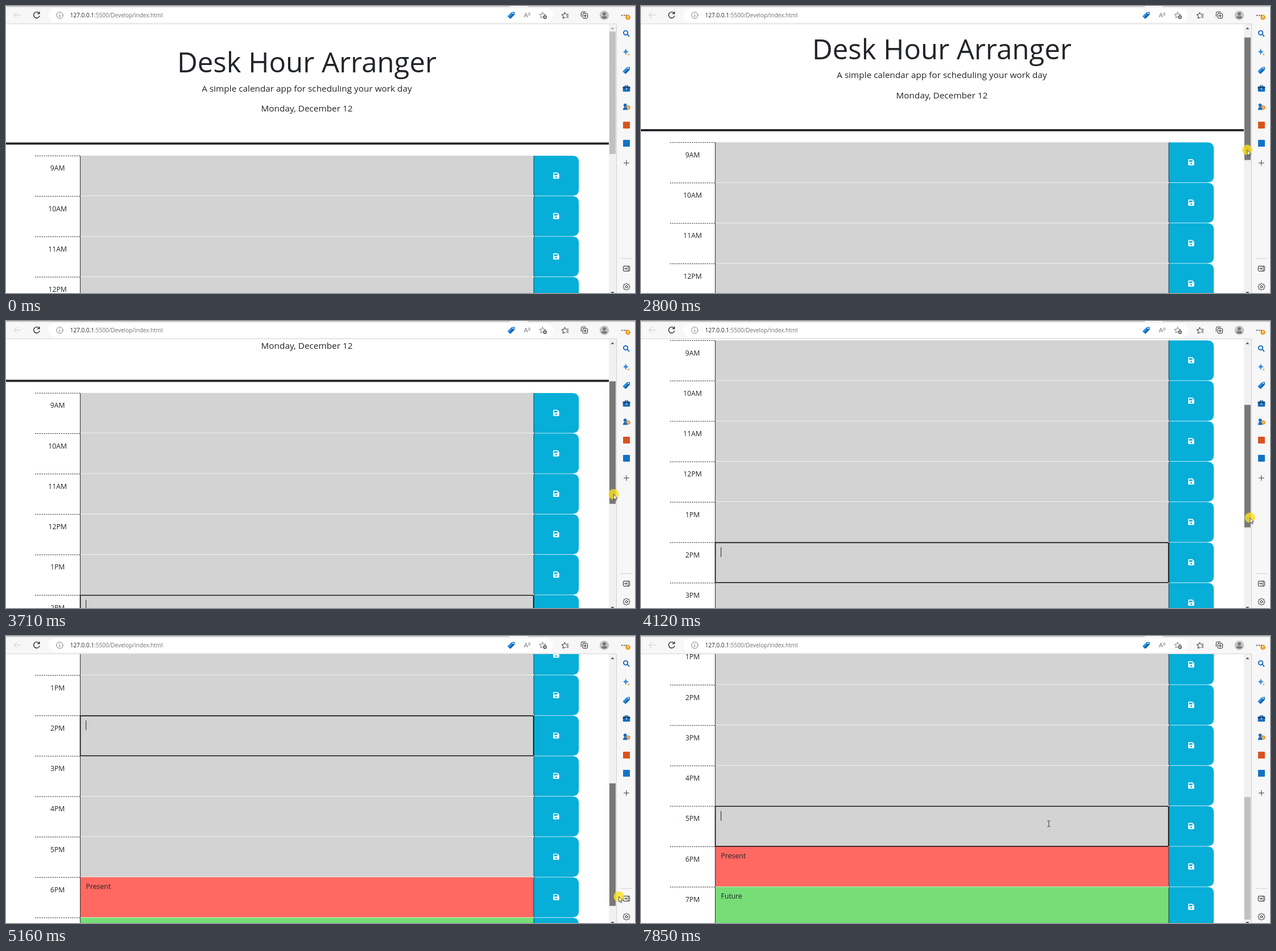
These frames come from a looping animation (1106 px wide and 506 px high, 7.99 s). An HTML page:

```html
<!DOCTYPE html>
<html lang="en">
<head>
<meta charset="utf-8">
<title>Day planner</title>
<style>
  html, body { margin: 0; height: 100%; overflow: hidden; background: #fff; }
  svg { display: block; }
  text { font-family: "Open Sans", "Noto Sans", sans-serif; fill: #212529; }
  .mid { text-anchor: middle; }
  .line { fill: none; stroke: #3b3b3b; stroke-linecap: round; stroke-linejoin: round; }
  .small { font-size: 12.27px; }
</style>
</head>
<body>
<svg width="1106" height="506" viewBox="0 0 1106 506">
  <defs>
    <path id="disk" fill="#fff" fill-rule="evenodd" d="M-4.2-5.4H2.2L5.3-2.3V4.2Q5.3 5.4 4.2 5.4H-4.2Q-5.3 5.4-5.3 4.2V-4.2Q-5.3-5.4-4.2-5.4ZM-3.8-3.8V-.8H2.3V-3.8ZM0 .8A1.5 1.5 0 0 0 0 3.8A1.5 1.5 0 0 0 0 .8Z"/>
    <g id="tag">
      <path fill="#1466b8" d="M-6 1.2L.4-5Q1-5.6 2-5.6L5.2-5.9Q6-5.9 6-5L5.8-1.6Q5.8-.8 5.2-.2L-.9 5.8Q-1.7 6.4-2.5 5.7L-6 2.6Q-6.6 1.9-6 1.2Z"/>
      <path fill="#2f92e0" d="M-6 1.2L.4-5Q1-5.6 2-5.6L5.2-5.9L-4 4.4L-6 2.6Q-6.6 1.9-6 1.2Z"/>
      <circle cx="3.4" cy="-3.4" r="1.1" fill="#fff"/>
    </g>
    <path id="star" d="M0-5.5L1.6-1.9L5.5-1.6L2.5 .9L3.4 4.7L0 2.7L-3.4 4.7L-2.5 .9L-5.5-1.6L-1.6-1.9Z"/>
  </defs>

  <rect width="1106" height="506" fill="#fff"/>
  <g id="page">
    <text class="mid" x="529" y="117.3" font-size="49.1">Desk Hour Arranger</text>
    <text class="mid" x="529" y="150.8" font-size="15.33">A simple calendar app for scheduling your work day</text>
    <text class="mid" x="529" y="186.4" font-size="15.33">Monday, December 12</text>
    <rect y="240.6" width="1060" height="3.8" fill="#212529"/>
    <g id="rows"></g>
    <g id="focus">
      <rect x="130.6" y=".2" width="797" height="70.6" rx="1.5" fill="none" stroke="#101010" stroke-width="1.6"/>
      <rect id="caret" x="140.2" y="8.5" width="1" height="17" fill="#222"/>
    </g>
  </g>

  <rect x="1060" y="32" width="13" height="474" fill="#f1f1f1"/>
  <path id="up" d="M1063.3 40.8L1066.4 37.4L1069.5 40.8Z"/>
  <path d="M1063.3 504L1066.4 507.4L1069.5 504Z" fill="#505050"/>
  <rect id="thumb" x="1061" width="11" height="216"/>

  <!-- toolbar -->
  <rect width="1106" height="31.5" fill="#f7f7f7"/>
  <path d="M0 .8H886M917 .8H1106" stroke="#cbcbcb" stroke-width="1.7"/>
  <path d="M0 31.4H1073" stroke="#d6d6d6"/>
  <rect x="75" y="4" width="887" height="24.5" rx="12.2" fill="#fff"/>
  <path class="line" d="M26 16H14M19 11L14 16L19 21" style="stroke:#c9c9c9"/>
  <path class="line" d="M58.6 13.3A5.3 5.3 0 1 0 59 17.6M58.9 10.4V13.6H55.6" style="stroke:#222" stroke-width="1.3"/>
  <g class="line" style="stroke:#777"><circle cx="94.5" cy="16.3" r="5.6"/><path d="M94.5 15.8V19M94.5 13.5V13.6" stroke-width="1.2"/></g>
  <text x="112.8" y="20" font-size="10">127.0.0.1<tspan fill="#707070">:5500/Develop/index.html</tspan></text>
  <use href="#tag" x="888.5" y="16.3"/>
  <text x="910.5" y="20.3" font-size="11.5" style="fill:#777">A</text>
  <path class="line" d="M918.4 12.6Q919.6 14.2 918.6 16M920.4 11.2Q922.4 14 920.6 17" style="stroke:#777" stroke-width=".9"/>
  <use href="#star" x="943.5" y="16.4" class="line" style="stroke:#777"/>
  <circle cx="947.7" cy="19.6" r="3.4" fill="#666"/>
  <path d="M945.9 19.6H949.5M947.7 17.8V21.4" stroke="#fff" stroke-width=".8"/>
  <path class="line" style="stroke:#222" d="M983.5 20.2L979.2 21.6L980 17.8L977 15.2L980.8 14.8L982.4 11L984 14.4M985.5 14.5H988.8M985.5 17.3H988.8M986 20.1H988.8"/>
  <g class="line" style="stroke:#222"><rect x="1014" y="13" width="8.6" height="8.6" rx="1.8"/><path d="M1011.3 18.4V12.5Q1011.3 10.4 1013.4 10.4H1019M1018.3 15V19.6M1016 17.3H1020.6"/></g>
  <circle cx="1052" cy="16.5" r="8.3" fill="#c6c4c2"/>
  <circle cx="1052" cy="14" r="2.9" fill="#777"/>
  <path d="M1047 20.8Q1047 17.9 1049.6 17.9H1054.4Q1057 17.9 1057 20.8Q1052 24 1047 20.8Z" fill="#777"/>
  <g fill="#222"><circle cx="1083" cy="16.5" r="1"/><circle cx="1087" cy="16.5" r="1"/><circle cx="1090.5" cy="16.5" r="1"/></g>
  <circle cx="1093.5" cy="20" r="4.4" fill="#eb9a1c"/>
  <path d="M1093.5 22.3V18M1091.8 19.5L1093.5 17.8L1095.2 19.5" fill="none" stroke="#fff" stroke-width=".9"/>

  <!-- side panel -->
  <rect x="1073" y="31.5" width="33" height="475" fill="#f7f7f7"/>
  <path d="M1073.5 31V506" stroke="#cfcfcf"/>
  <g class="line" style="stroke:#1769bd" stroke-width="1.9"><circle cx="1089.6" cy="47.3" r="3.7"/><path d="M1092.5 50.2L1095.5 53.4"/></g>
  <path d="M1089.7 74.5Q1090.4 79.9 1095.6 80.6Q1090.4 81.4 1089.7 87Q1089 81.4 1084.3 80.6Q1089 79.9 1089.7 74.5Z" fill="#3b8fdb"/>
  <path d="M1094.8 83Q1095.1 85.2 1097.4 85.5Q1095.1 85.8 1094.8 88Q1094.5 85.8 1092.2 85.5Q1094.5 85.2 1094.8 83Z" fill="#e9a63a"/>
  <use href="#tag" x="1091" y="113.5"/>
  <path class="line" d="M1088.6 142.5V140.6H1093.4V142.5" style="stroke:#124b84" stroke-width="1.3"/>
  <rect x="1084.7" y="142" width="12.6" height="9" rx="1.3" fill="#1b6dbc"/>
  <rect x="1084.7" y="142" width="12.6" height="3.6" rx="1.3" fill="#124b84"/>
  <rect x="1089.7" y="144.6" width="2.6" height="2.6" fill="#8cc6f5"/>
  <circle cx="1094" cy="179" r="3.8" fill="#e8973b"/>
  <circle cx="1094" cy="179" r="1.2" fill="#f9d9a8"/>
  <circle cx="1088.7" cy="174.9" r="2.9" fill="#1b6dbc"/>
  <path d="M1084.6 183.3Q1084.8 180 1087.4 178H1090Q1092.6 180 1092.8 183.3Z" fill="#1b6dbc"/>
  <rect x="1085" y="204" width="12" height="12" rx="1" fill="#d9531e"/>
  <rect x="1085" y="236" width="12" height="12" rx="1" fill="#1273c6"/>
  <path class="line" d="M1086.4 276.8H1095.4M1090.9 272.3V281.3"/>
  <path d="M1080.5 445.2H1101" stroke="#cfcfcf"/>
  <g class="line" style="stroke:#222"><rect x="1085.3" y="458.6" width="11.4" height="8.8" rx="1.6"/><path d="M1087.3 463H1091.6M1090 461.2L1091.8 463L1090 464.8M1094 459V467"/></g>
  <g class="line" style="stroke:#222"><path id="gear"/><circle cx="1091" cy="495" r="2"/></g>

  <circle id="halo" r="9.2" fill="#fae01e" fill-opacity=".8"/>
  <path id="arrow" d="M0 0V9.6L2.2 7.6L3.7 11.1L5.2 10.5L3.7 7.1H6.7Z" fill="#fff" stroke="#222" stroke-width=".8" stroke-linejoin="round"/>
  <path id="beam" d="M-2.6-5H-.7L0-4.4L.7-5H2.6M0-4.4V4.4M-2.6 5H-.7L0 4.4L.7 5H2.6" fill="none" stroke="#333" stroke-width=".95"/>
</svg>
<script>
const LOOP = 7990, TOP = 264, PITCH = 71.25, MAX_SCROLL = 534, MAX_THUMB = 239;
const STEP = 68.9, PHASE = 2455;
const $ = id => document.getElementById(id);

const notes = { 9: ['#ff6961', 'Present'], 10: ['#77dd77', 'Future'] };
const row = i => {
  const hour = 9 + i;
  const label = (hour > 12 ? hour - 12 : hour) + (hour < 12 ? 'AM' : 'PM');
  const [fill, note] = notes[i] || ['#d3d3d3', ''];
  return `<g transform="translate(0 ${TOP + i * PITCH})">
    <path d="M51 .2H130.5" stroke="#111" stroke-width=".9" stroke-dasharray="2.3 1.53"/>
    <text class="mid small" x="90.7" y="26.4">${label}</text>
    <rect x="131" y="-.2" width="797" height="70.6" fill="${fill}"/>
    <path d="M130.6 0V71.2" stroke="#111" stroke-width=".9"/>
    <text class="small" x="140.6" y="20.6">${note}</text>
    <path d="M930 0H995.5Q1007.2 0 1007.2 11.5V59Q1007.2 70.5 995.5 70.5H930Q928 70.5 928 68.5V2Q928 0 930 0Z" fill="#06aed8"/>
    <path d="M930 .2Q928 .2 928 2V68.5Q928 70.3 930 70.3" fill="none" stroke="#12303a" stroke-width=".9"/>
    <use href="#disk" x="967.4" y="35"/>
  </g>`;
};
$('rows').innerHTML = Array.from({ length: 11 }, (_, i) => row(i)).join('');

// gear outline with eight soft teeth
$('gear').setAttribute('d', 'M' + Array.from({ length: 64 }, (_, i) => {
  const a = i * Math.PI / 32, r = 5.4 + 0.8 * Math.cos(8 * a);
  return (1091 + r * Math.cos(a)).toFixed(2) + ' ' + (495 + r * Math.sin(a)).toFixed(2);
}).join('L') + 'Z');

// pointer paths: time, x, y
const arrowPath = [
  [600, 1065, 500], [1340, 1062, 310], [1500, 1061, 266], [1850, 1066, 243],
  [2465, 1066, 243], [2809, 1066, 253.7], [3250, 1067, 276], [3705, 1068.5, 305.5],
  [4150, 1071, 350], [4601, 1074, 402], [4950, 1076.5, 440], [5400, 1079, 483],
  [5710, 1080, 501], [6117, 1079, 511], [6300, 1079, 516]
];
const beamPath = [
  [6580, 984, 497], [6850, 824, 445], [6920, 800, 426], [7000, 770, 396],
  [7310, 697, 310], [7380, 697, 310], [7490, 717, 331]
];
// thumb offset while it is dragged
const dragPath = [
  [2465, 0], [2809, 10.5], [3250, 33], [3705, 61.3], [4150, 106],
  [4601, 156.5], [4950, 195], [5400, MAX_THUMB]
];

function along(path, t) {
  const n = path.findIndex(p => p[0] > t);
  if (n < 0) return path[path.length - 1].slice(1);
  if (n === 0) return path[0].slice(1);
  const a = path[n - 1], b = path[n], k = (t - a[0]) / (b[0] - a[0]);
  return a.slice(1).map((v, i) => v + (b[i + 1] - v) * k);
}
const move = (id, x, y) => $(id).setAttribute('transform', `translate(${x} ${y})`);
const show = (id, on) => $(id).setAttribute('visibility', on ? 'visible' : 'hidden');
const within = (t, a, b) => t >= a && t < b;

function draw(t) {
  const s = PHASE + Math.floor((t - PHASE) / STEP) * STEP + 10;
  const beaming = t >= 6580;
  const [x, y] = along(beaming ? beamPath : arrowPath, s);
  const [offset] = along(dragPath, s);
  const dragging = within(t, 2230, 6250), clicked = t >= 7650;

  move('page', 0, -offset * MAX_SCROLL / MAX_THUMB);
  move('thumb', 0, 45 + offset);
  $('thumb').setAttribute('fill', dragging ? '#787878' : within(t, 1600, 2230) ? '#a8a8a8' : '#c1c1c1');
  $('up').setAttribute('fill', offset > 0 ? '#505050' : '#a3a3a3');

  move('focus', 0, TOP + (clicked ? 8 : 5) * PITCH);
  show('caret', !within(t, 6640, 7170));

  move('arrow', x, y);
  move('beam', x, y);
  move('halo', x, y);
  show('arrow', within(t, 600, 6310));
  show('beam', beaming);
  show('halo', dragging || within(t, 7650, 7850));
}

function tick() {
  draw(performance.now() % LOOP);
  requestAnimationFrame(tick);
}
tick();
</script>
</body>
</html>
```
